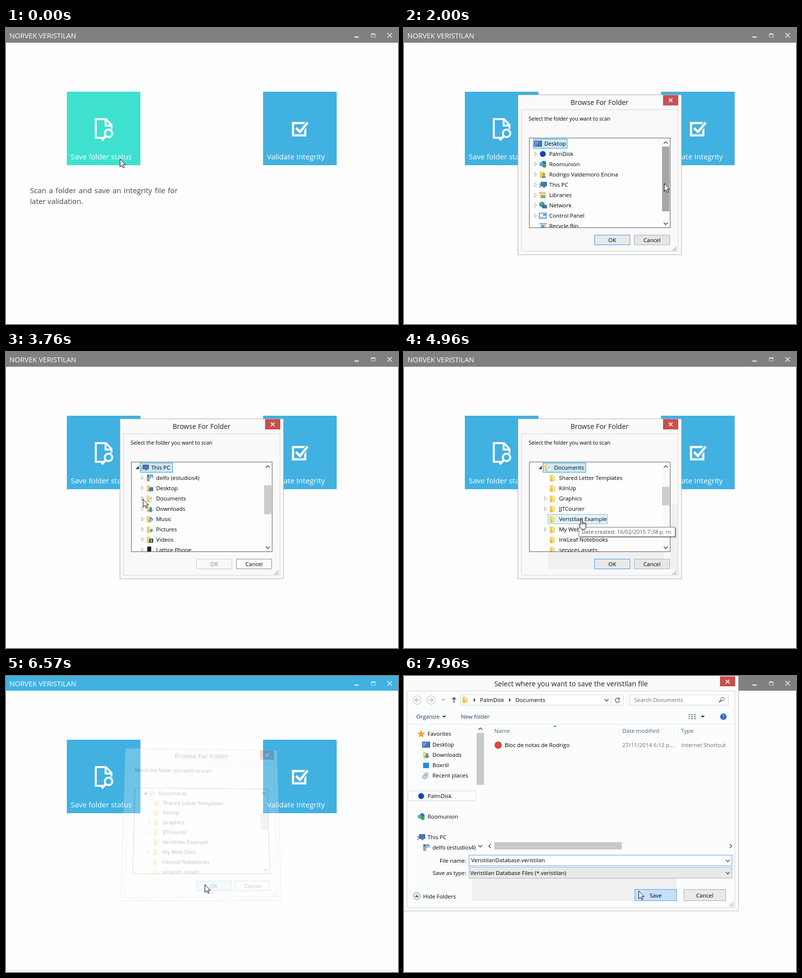
Recreate the animation shown at these times as an HTML page. Size 799x604 px, loop 8 s.

```html
<!DOCTYPE html>
<html lang="en">
<head>
<meta charset="utf-8">
<title>Folder check</title>
<style>
html, body { margin: 0; width: 100%; height: 100%; overflow: hidden; background: #fefefe; }
body, text { font-family: "Open Sans", "Noto Sans", sans-serif; }
svg { position: absolute; left: 0; top: 0; overflow: hidden; }
#app, #pointer { width: 100%; height: 100%; }
#browse { left: 231px; top: 135px; }
p { position: absolute; left: 49px; top: 320px; width: 301px; margin: 0;
    font-size: 15px; line-height: 22px; text-align: justify; color: #444; }
</style>
</head>
<body>
<svg id="app"></svg>
<p id="hint">Scan a folder and save an integrity file for later validation.</p>
<svg id="browse" width="336" height="329" viewBox="231 135 336 329"></svg>
<svg id="save" width="683" height="481"></svg>
<svg id="pointer"></svg>
<script>
const $ = id => document.getElementById(id);
const BLUE = '#41b1e1';

// Drawing helpers, all returning SVG markup
const rect = (x, y, w, h, fill) => `<rect x="${x}" y="${y}" width="${w}" height="${h}" fill="${fill}"/>`;
const box = (x, y, w, h, fill, line) =>
  `<rect x="${x + .5}" y="${y + .5}" width="${w - 1}" height="${h - 1}" fill="${fill}" stroke="${line}"/>`;
const disc = (x, y, r, fill, line = 'none') => `<circle cx="${x}" cy="${y}" r="${r}" fill="${fill}" stroke="${line}"/>`;
const fillPath = (d, fill) => `<path d="${d}" fill="${fill}"/>`;
const line = (d, color, w = 1) => `<path d="${d}" fill="none" stroke="${color}" stroke-width="${w}"/>`;
const at = (x, y, body, turn = 0) => `<g transform="translate(${x} ${y}) rotate(${turn})">${body}</g>`;
const text = (x, y, s, size = 11.4, fill = '#000', anchor = 'start') =>
  `<text x="${x}" y="${y}" font-size="${size}" fill="${fill}" text-anchor="${anchor}">${s}</text>`;
const chevron = (x, y, turn) => at(x, y, line('M-4 2L0-2 4 2', '#555', 1.7), turn);
const triangle = (x, y, turn, fill = '#444') => at(x, y, fillPath('M-4-2H4L0 2z', fill), turn);
const cross = (x, y, color, r = 4) =>
  line(`M${x - r} ${y - r}l${2 * r} ${2 * r}m0 ${-2 * r}l${-2 * r} ${2 * r}`, color, 1.8);
const button = (x, y, w, h, label, fill, edge, color) =>
  box(x, y, w, h, fill, edge) + text(x + w / 2, y + h / 2 + 4.5, label, 11.4, color, 'middle');
const grip = (x, y) => [[6, 0], [3, 3], [6, 3], [0, 6], [3, 6], [6, 6]]
  .map(([a, b]) => rect(x + a, y + b, 2, 2, '#aaa')).join('');

// 16 px icons
const folder = fillPath('M2 2h6l1 1v12H2z', '#f0cf68') + fillPath('M6 3l7 1v11H4z', '#f8e08c') +
  fillPath('M4 15l2-9 2 9z', '#e0b34c');
const screen = (x, y, w, h) => rect(x, y, w, h, '#3c4658') + rect(x + 1, y + 1, w - 2, h - 2, '#3f78d0');
const note = fill => folder + rect(7, 6, 8, 8, fill);
const icons = {
  folder,
  desktop: screen(0, 2, 16, 12) + fillPath('M1 3h10l-8 10h-2z', '#6c9be3'),
  drive: disc(8, 8, 6, '#094ab2'),
  group: disc(10, 6, 5, '#2d6fc0') + disc(5, 8, 4, '#5aa7d8') + disc(11, 11, 4, '#4ba33f'),
  user: folder + disc(10, 7, 2.5, '#b98a4a') + fillPath('M6 15q0-5 4-5t4 5z', '#7f9a5c'),
  pc: screen(4, 2, 12, 9) + rect(8, 11, 5, 3, '#8a93a0') + rect(0, 5, 4, 9, '#b9c1ca') + rect(1, 6, 2, 1, '#3b7'),
  library: rect(0, 2, 14, 4, '#eac55d') + rect(2, 5, 13, 10, '#f8e08c') + rect(4, 8, 9, 6, '#62aee0'),
  network: disc(6, 6, 5.5, '#3d8fd0') + fillPath('M2 4q4-4 7 0l-3 5z', '#58b04a') + screen(7, 7, 9, 7),
  panel: rect(0, 2, 16, 12, '#3d82c0') + rect(1, 3, 14, 10, '#a9d3f0') + disc(5, 7, 3, '#fff') +
    rect(9, 5, 5, 2, '#2f69a8') + rect(9, 9, 5, 2, '#fff'),
  bin: fillPath('M2 3h13l-2 12H4z', '#b9d0e0') + rect(1, 2, 15, 2, '#8eabc0') + disc(8, 9, 3, '#5d9bd0'),
  media: rect(2, 1, 6, 14, '#9aa3ab') + rect(3, 3, 4, 2, '#444') + line('M10 9V2l4 1v5', '#3a8fd8', 2),
  screenFolder: note('#3f78d0'),
  docs: folder + rect(6, 3, 8, 10, '#fff') + line('M7 5.5h6m-6 2h6m-6 2h6', '#93a9bf'),
  down: folder + fillPath('M8 5h4v5h3l-5 5-5-5h3z', '#2c8fdc'),
  music: folder + line('M9 13V5l4 2v4', '#2c8fdc', 2),
  picture: note('#fff') + rect(8, 7, 6, 4, '#69b1e0') + rect(8, 11, 6, 2, '#5a9a50'),
  video: note('#333') + rect(9, 7, 4, 6, '#6ab0e0'),
  phone: rect(3, 1, 8, 15, '#222'),
  box: rect(2, 3, 12, 11, '#2a8ae6'),
  recent: rect(3, 1, 11, 12, '#dfe6ec') + line('M5 4h7m-7 3h7', '#7d93a8') + disc(5, 11, 4, '#c9d8e4', '#8297a8'),
  star: fillPath('M8 0l2.4 5.2 5.6.6-4.2 3.8 1.2 5.6L8 12.4l-5 2.8 1.2-5.6L0 5.8l5.6-.6z', '#f6a53a'),
  link: disc(8, 8, 7.5, '#dc4b3e')
};
const icon = (name, x, y) => at(x, y, icons[name]);

// Key times in ms
const HOVER_END = 500, PC_OPEN = 3330, DOCS_OPEN = 4300, TIP = 4950, PICK = 5540, CLOSE = 6420, SAVE_OPEN = 6880;
const clamp = v => Math.max(0, Math.min(1, v));
const span = (t, a, b) => clamp((t - a) / (b - a));
const smooth = p => p * p * (3 - 2 * p);
const easeOut = p => 1 - (1 - p) ** 2;

// Main window
function drawApp(t) {
  const active = t >= CLOSE && t < SAVE_OPEN;
  const first = t < HOVER_END ? '#40e0d0' : BLUE;
  return rect(0, 0, 799, 30, active ? BLUE : '#808080') +
    text(7, 21, 'NORVEK VERISTILAN', 14.3, '#fff') +
    '<g opacity=".68">' + rect(710, 17, 9, 3, '#fff') + box(744, 11, 9, 8, 'none', '#fff') +
    rect(744, 11, 9, 3, '#fff') + cross(782, 15, '#fff', 4.5) + '</g>' +
    (active ? rect(0, 600, 799, 1, '#ddd') : '') +
    rect(124, 130, 150, 150, first) + rect(524, 130, 150, 150, BLUE) +
    line('M197 224H183V186H204L215 198V206M203 186V199H215', '#fff', 4) +
    disc(209, 215, 10.5, first) +
    '<circle cx="209" cy="215" r="7.7" fill="none" stroke="#fff" stroke-width="4"/>' +
    line('M203.5 220.5L195 229', '#fff', 5) +
    line('M585 194H610V219H585Z', '#fff', 4.5) +
    line('M591 204L599 212 617 191', BLUE, 9) + line('M591 204L599 212 615 193', '#fff', 5) +
    text(132, 268, 'Save folder status', 15, '#fff') + text(532, 268, 'Validate Integrity', 15, '#fff');
}

// Tree rows: level, label, icon, expander (0 none, 1 closed, 2 open)
const above = [[0, 'Desktop', 'desktop', 0], [1, 'PalmDisk', 'drive', 1], [1, 'Roomunion', 'group', 1],
  [1, 'Rodrigo Valdemoro Encina', 'user', 1]];
const below = [[1, 'Libraries', 'library', 1], [1, 'Network', 'network', 1],
  [1, 'Control Panel', 'panel', 1], [1, 'Recycle Bin', 'bin', 0]];
const pcStart = [[2, 'delfo (estudios4)', 'media', 1], [2, 'Desktop', 'screenFolder', 1]];
const pcEnd = [[2, 'Downloads', 'down', 1], [2, 'Music', 'music', 1], [2, 'Pictures', 'picture', 1],
  [2, 'Videos', 'video', 1], [2, 'Lattice Phone', 'phone', 1]];
const docItems = [['Shared Letter Templates', 0], ['KilnUp', 0], ['Graphics', 1], ['JJTCourier', 1],
  ['Veristilan Example', 0], ['My Web Sites', 1], ['InkLeaf Notebooks', 0], ['services assets', 0]]
  .map(([label, exp]) => [3, label, 'folder', exp]);
const markWidth = { 'Desktop': 70, 'This PC': 67, 'Documents': 88, 'Veristilan Example': 122 };

function drawTree(t) {
  const pc = t >= PC_OPEN, docs = t >= DOCS_OPEN;
  const rows = [...above, [1, 'This PC', 'pc', pc ? 2 : 1],
    ...(pc ? [...pcStart, [2, 'Documents', 'docs', docs ? 2 : 1], ...(docs ? docItems : []), ...pcEnd] : []),
    ...below];
  const scroll = 84 * smooth(span(t, PC_OPEN, 3480)) + 63 * smooth(span(t, DOCS_OPEN, 4440));
  const chosen = t >= CLOSE ? '' : t >= PICK ? 'Veristilan Example' : docs ? 'Documents' : pc ? 'This PC' : 'Desktop';
  const hot = t > 4780 && t < PICK ? 'Veristilan Example' : '';
  const hotArrow = t > 3000 && !pc ? 'This PC' : t > 3680 && !docs ? 'Documents' : '';
  return rows.map(([level, label, pic, exp], i) => {
    const x = 286 + 10 * level, y = 236 + 21 * i - scroll;
    if (y < 210 || y > 420) return '';
    const mark = label === chosen ? ['#cbe8f6', '#26a0da'] : label === hot ? ['#e5f3fb', '#70c0e7'] : 0;
    return (mark ? box(x - 23, y - 10, markWidth[label], 20, ...mark) : '') +
      (exp === 1 ? at(x - 29.5, y, `<path d="M0-4l4.5 4-4.5 4z" fill="#fff" stroke="${label === hotArrow ? '#1bb4f0' : '#a6a6a6'}"/>`) : '') +
      (exp === 2 ? at(x - 31, y, fillPath('M6-4v7h-7z', '#404040')) : '') +
      icon(pic, x - 21, y - 8) + text(x, y + 4, label);
  }).join('');
}

function drawBrowse(t) {
  const pc = t >= PC_OPEN, docs = t >= DOCS_OPEN, off = pc && !docs, closing = t >= CLOSE;
  const [top, size] = docs ? [275, 38] : pc ? [272, 59] : [242, 132];
  const thumb = t > 1960 && t < 2560 ? '#a6a6a6' : '#cdcdcd';
  const okFill = off ? '#f9f9f9' : closing ? '#d9ecfb' : '#e8e8e8';
  const [cancelFill, cancelEdge] = off || closing ? ['#fafafa', '#8a8a8a'] : ['#e6e6e6', '#adadad'];
  return '<clipPath id="list"><rect x="256" y="225" width="270" height="182"/></clipPath>' +
    box(231, 135, 336, 329, 'none', 'rgba(0,0,0,.06)') + box(232, 136, 334, 327, '#fafafa', '#bdbdbd') +
    text(398.5, 157, 'Browse For Folder', 14, '#222', 'middle') +
    rect(528, 137, 31, 21, '#c75050') + cross(543.5, 147.5, '#fff', 3.7) +
    box(239, 166, 320, 290, '#f9f9f9', '#d6d6d6') +
    (t >= TIP && !closing ? rect(293, 407, 237, 36, '#f0f0f0') + rect(543, 309, 15, 134, '#f0f0f0') : '') +
    text(254, 189, 'Select the folder you want to scan', 10.6) +
    box(255, 224, 288, 184, '#fdfdfd', '#5c5c5c') +
    `<g clip-path="url(#list)">${drawTree(t)}</g>` +
    rect(526, 225, 16, 182, '#fafafa') + rect(526, top, 15, size, thumb) +
    chevron(533.5, 234, 0) + chevron(533.5, 399, 180) +
    button(388, 422, 73, 21, 'OK', okFill, off ? '#c9c9c9' : '#3399ff', off ? '#838383' : '#000') +
    button(469, 422, 73, 21, 'Cancel', cancelFill, cancelEdge, '#000') +
    grip(547, 446) +
    (t >= TIP && t < PICK ? rect(359, 359, 196, 20, 'rgba(0,0,0,.3)') + box(356, 357, 197, 20, '#fff', '#767676') +
      text(362, 371, 'Date created: 16/02/2015 7:38 p. m.', 11.1, '#575757') : '');
}

function drawSave(t) {
  const hover = t > 7560;
  const gray = '#6d6d6d', head = '#4c607a';
  const side = [[27, 118, 'star', 'Favorites'], [37, 140, 'desktop', 'Desktop'], [37, 161, 'down', 'Downloads'],
    [37, 182, 'box', 'Boxrill'], [37, 203, 'recent', 'Recent places'], [27, 245, 'drive', 'PalmDisk'],
    [27, 287, 'group', 'Roomunion'], [27, 329, 'pc', 'This PC'], [37, 350, 'media', 'delfo (estudios4)']];
  return box(-1, -1, 683, 481, '#fafafa', '#bdbdbd') + box(6, 30, 669, 443, '#fbfdfd', '#d6d6d6') +
    text(340.5, 21, 'Select where you want to save the veristilan file', 14.25, '#222', 'middle') +
    rect(644, 1, 31, 20, '#c75050') + cross(659.5, 11.5, '#fff', 3.7) +
    disc(27, 49, 8.5, '#fff', '#b5b5b5') + line('M32 49h-9m4-4l-4 4 4 4', '#b5b5b5', 1.7) +
    disc(55, 49, 8.5, '#fff', '#b5b5b5') + line('M50 49h9m-4-4l4 4-4 4', '#b5b5b5', 1.7) +
    triangle(80, 49, 0, '#b5b5b5') + line('M102 55V44m-4 4l4-4 4 4', '#555', 1.8) +
    box(115, 38, 333, 22, '#fff', '#d9d9d9') + icon('folder', 117, 40) +
    triangle(144, 49, -90) + text(155, 53, 'PalmDisk') + triangle(216, 49, -90) + text(227, 53, 'Documents') +
    chevron(413, 49, 180) + rect(422, 39, 1, 20, '#d9d9d9') +
    line('M438.5 46.5a4.5 4.5 0 1 0 1 4M439 44v3.5h-3.5', '#666', 1.5) +
    box(460, 38, 202, 22, '#fff', '#d9d9d9') + text(469, 53, 'Search Documents', 11.4, gray) +
    disc(649, 47, 3.5, 'none', '#555') + line('M646.5 49.5l-4 4', '#555', 2) +
    text(25, 87, 'Organize', 11.4, '#1e395b') + triangle(82, 83, 0, '#1e395b') +
    text(116, 87, 'New folder', 11.4, '#1e395b') +
    [78, 82, 86].map(y => rect(580, y, 3, 2, '#6d8db0') + rect(585, y, 4, 2, '#888') + rect(591, y, 4, 2, '#888')).join('') +
    triangle(609, 83, 0, '#1e395b') + disc(651, 83, 6.5, '#2f62c4', '#8fa9d8') + text(651, 87, '?', 11, '#fff', 'middle') +
    rect(7, 98, 668, 1, '#e6ebee') +
    box(8, 234, 139, 21, '#fdfdfd', '#d9d9d9') +
    side.map(([x, y, pic, s]) => icon(pic, x, y - 8) + text(x + 21, y + 4, s)).join('') +
    chevron(155.5, 108, 0) + rect(148, 116, 15, 106, '#c9c9c9') + chevron(155.5, 347, 180) +
    text(184, 116, 'Name', 11.4, head) + text(445, 116, 'Date modified', 11.4, head) + text(565, 116, 'Type', 11.4, head) +
    rect(438, 99, 1, 23, '#e2eef6') + rect(558, 99, 1, 23, '#e2eef6') + fillPath('M304 104l3.5-3.5 3.5 3.5z', '#5b8fb5') +
    icon('link', 184, 133) + text(205, 145, 'Bloc de notas de Rodrigo') +
    text(445, 145, '27/11/2014 6:12 p....', 11.4, gray) + text(565, 145, 'Internet Shortcut', 11.4, gray) +
    chevron(175, 347, -90) + rect(184, 339, 260, 15, '#c9c9c9') + chevron(666, 347, 90) +
    text(127, 381, 'File name:', 11.4, '#000', 'end') + text(127, 406, 'Save as type:', 11.4, '#000', 'end') +
    rect(138, 412, 418, 47, '#f0f0f0') +
    box(132, 365, 537, 23, '#fff', '#569de5') + text(137, 380, 'VeristilanDatabase.veristilan') + chevron(660, 377, 180) +
    box(132, 390, 537, 23, '#e9e9e9', '#acacac') + text(135, 406, 'Veristilan Database Files (*.veristilan)') + chevron(660, 402, 180) +
    disc(26, 449, 7.5, '#dfe6ee', '#9aa8b8') + triangle(26, 449, 180, '#2c4f86') + text(39, 454, 'Hide Folders') +
    button(470, 435, 86, 24, 'Save', hover ? '#c6e0fb' : '#e9e9e9', '#569de5') +
    button(570, 435, 86, 24, 'Cancel', '#e9e9e9', '#acacac') + grip(663, 462);
}

// Pointer path: time, x, y
const path = [[0, 232, 267], [1450, 232, 267], [2000, 530, 317], [2520, 530, 317], [3060, 267, 314], [3330, 267, 314],
  [3740, 279, 300], [4330, 279, 300], [4830, 361, 340], [6000, 361, 340], [6420, 405, 425], [7150, 405, 425],
  [7830, 478, 438], [8000, 478, 438]];
const shape = d => `<path d="${d}" fill="#fff" stroke="#000" stroke-linejoin="round"/>`;
const arrow = shape('M.5.5V16.5L4.2 13 6.5 18.5 9 17.5 6.7 12H11.5Z');
const resize = shape('M-10.5 0l5-4.5v3h12v-3l5 4.5-5 4.5v-3h-12v3z');
const hand = at(-5, -1, shape('M4 13V2.5a1.5 1.5 0 0 1 3 0V9l6.5 1.2q2 .5 1.8 2.5l-.8 6-1.5 4H5.5L1 15.5q-1-2 1-2.3z') +
  line('M7 9v4m3-3.5v3.5m3-3v3', '#000'));

function drawPointer(t) {
  const i = path.findIndex(k => k[0] > t), [t0, x0, y0] = path[i - 1], [t1, x1, y1] = path[i];
  const p = smooth(span(t, t0, t1));
  const kind = t > 620 && t < 1440 ? resize : t > 4720 && t < 6150 ? hand : arrow;
  return at(x0 + (x1 - x0) * p, y0 + (y1 - y0) * p, kind);
}

// k is how far a dialog is open; tilt and turn are its angles when fully closed
function pose(el, k, tilt, turn) {
  const away = 1 - k;
  el.style.display = k > 0 ? '' : 'none';
  el.style.opacity = k;
  el.style.transform = away
    ? `perspective(760px) rotateX(${tilt * away}deg) rotateY(${turn * away}deg) scale(${1 - .06 * away})` : 'none';
}
const put = (id, markup) => {
  const el = $(id);
  if (el.markup !== markup) el.innerHTML = el.markup = markup;
};

function frame() {
  const t = performance.now() % 8000;
  put('app', drawApp(t));
  put('browse', drawBrowse(t));
  put('save', drawSave(t));
  put('pointer', drawPointer(t));
  $('hint').hidden = t >= HOVER_END;
  if (t < CLOSE) pose($('browse'), easeOut(span(t, 480, 890)), -10.7, 0);
  else pose($('browse'), 1 - span(t, CLOSE, 6620), 10.7, 3);
  pose($('save'), easeOut(span(t, SAVE_OPEN, 7260)), -10.7, 0);
  requestAnimationFrame(frame);
}
frame();
</script>
</body>
</html>
```
